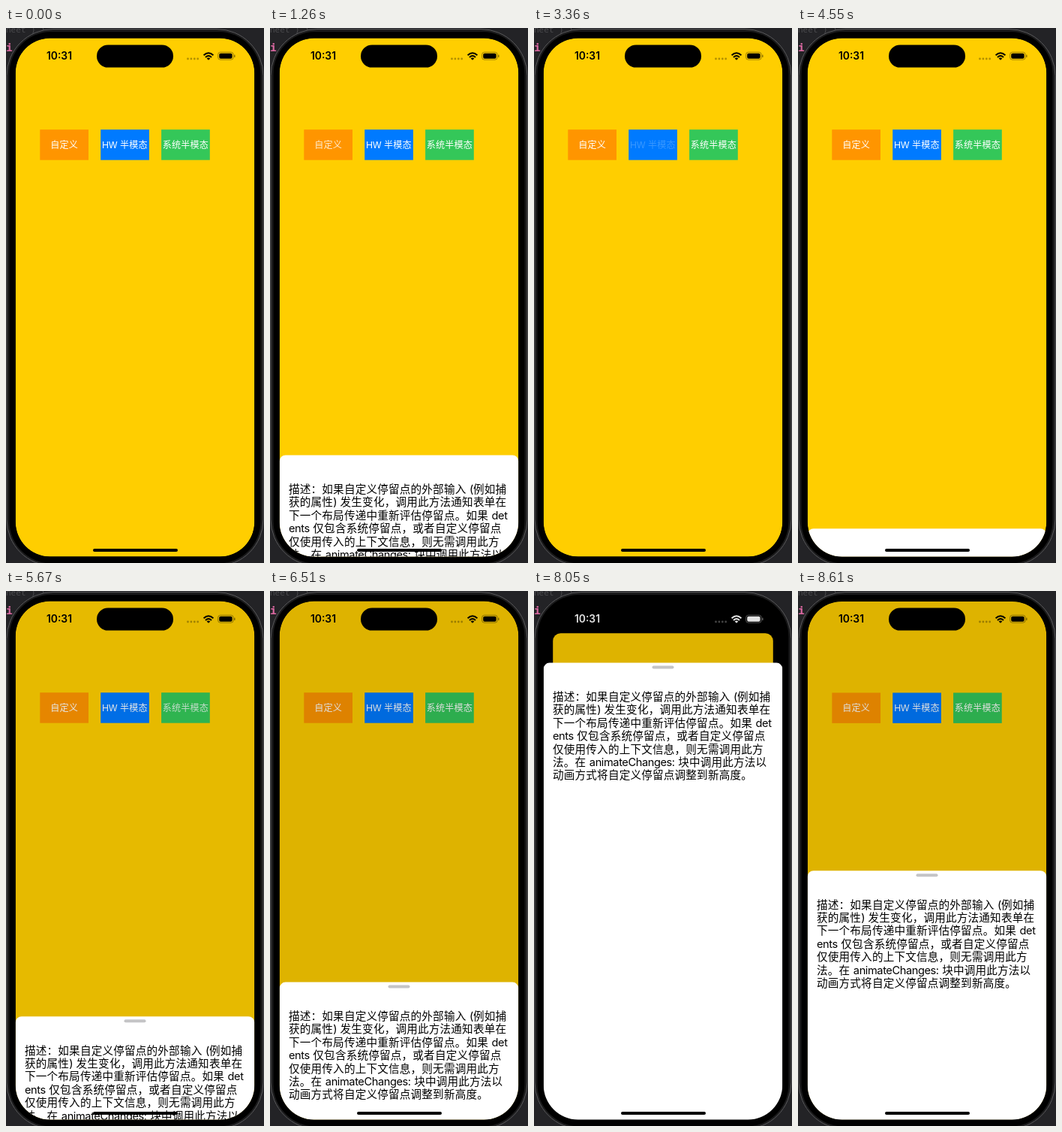
An HTML page that plays this animation: 344x712 px, repeating every 8680 ms.

```html
<!DOCTYPE html>
<html lang="zh-CN">
<head>
<meta charset="utf-8">
<title>半模态</title>
<style>
html, body { margin: 0; width: 100%; height: 100%; overflow: hidden; background: #232326; }
svg { display: block; width: 344px; height: 712px; }
text { font-family: "Noto Sans CJK SC", "Noto Sans CJK", sans-serif; white-space: pre; letter-spacing: .2px; }
.latin { font-family: Inter, Roboto, sans-serif; letter-spacing: -.4px; word-spacing: .8px; }
.label { font-size: 12.1px; fill: #fff; text-anchor: middle; }
.body { font-size: 14.58px; }
.code { font-family: "Noto Sans Mono", "DejaVu Sans Mono", monospace; letter-spacing: 0; }
.time { font: 600 13.8px Inter, sans-serif; letter-spacing: 0; text-anchor: middle; fill: currentColor; }
</style>
</head>
<body>
<svg viewBox="0 0 344 712">
  <defs>
    <clipPath id="screenClip"><rect x="12.7" y="13.6" width="318.6" height="689.8" rx="46"/></clipPath>
    <clipPath id="cardClip"><rect id="cardShape" x="12.7" y="13.6" width="318.6" height="689.8" rx="46"/></clipPath>
  </defs>

  <rect width="344" height="712" fill="#232326"/>
  <text class="code" x="0" y="6" font-size="11" fill="#4b4b4e">heet ) }</text>
  <text class="code" x="0" y="31" font-size="15" font-weight="700" fill="#d7679f">i</text>

  <rect x="1" y="1.5" width="342" height="714.5" rx="62" fill="#1b1b1c" stroke="#59595b"/>
  <rect x="4.5" y="5" width="335" height="707.5" rx="56" fill="#000"/>

  <g clip-path="url(#screenClip)">
    <g id="card">
      <g clip-path="url(#cardClip)">
        <rect x="12" y="13" width="320" height="691" fill="#ffce00"/>
        <g id="buttons"></g>
        <rect id="dim" x="12" y="13" width="320" height="691" opacity="0"/>
      </g>
    </g>
    <g id="sheet">
      <rect x="12.7" width="318.6" height="720" rx="8" fill="#fff"/>
      <rect id="grabber" x="157.5" y="4" width="29" height="4" rx="2" fill="#c4c4c6"/>
      <g id="lines"></g>
    </g>
  </g>

  <rect x="121" y="22.4" width="102" height="30.2" rx="15.1"/>
  <g id="status">
    <text class="time" x="71" y="42">10:31</text>
    <g id="dots" fill="currentColor" opacity=".3"></g>
    <g fill="none" stroke="currentColor" stroke-width="2">
      <path d="M263.6 36.2Q270 30.4 276.4 36.2"/>
      <path d="M266 38.9Q270 35.2 274 38.9"/>
    </g>
    <path d="M267.7 40.5Q270 38.5 272.3 40.5L270 42.8Z" fill="currentColor"/>
    <rect x="282.6" y="32.2" width="20.6" height="10" rx="3.2" fill="none" stroke="currentColor" stroke-opacity=".4" stroke-width=".9"/>
    <rect x="284.2" y="33.7" width="17.4" height="7" rx="2" fill="currentColor"/>
    <rect x="304.2" y="35.5" width="1.3" height="3.5" rx=".6" fill="currentColor" opacity=".45"/>
  </g>
  <rect x="116" y="693" width="113" height="4" rx="2"/>
</svg>

<script>
const LOOP = 8680, STEP = 70;
const OFF = 712, LOW = 520.6, MID = 374, HIGH = 70;
const $ = id => document.getElementById(id);
const clamp = v => Math.min(1, Math.max(0, v));

// Easings take elapsed and total milliseconds.
const easeOut = (t, d) => 1 - (1 - clamp(t / d)) ** 2;
const easeInOut = (t, d) => (1 - Math.cos(Math.PI * clamp(t / d))) / 2;
const spring = t => 1 - (1 + .012 * t) * Math.exp(-.012 * t);

// start, duration, from, to, easing
const moves = [
  [0, 1, OFF, OFF, easeOut],
  [1050, 420, OFF, LOW, easeOut],
  [2170, 260, LOW, 704, easeOut],
  [2450, 1, OFF, OFF, easeOut],
  [3480, 0, OFF, LOW, spring],
  [4270, 400, LOW, 704, easeInOut],
  [4690, 1, OFF, OFF, easeOut],
  [5440, 0, OFF, LOW, spring],
  [6510, 0, LOW, MID, spring],
  [7256, 0, MID, HIGH, spring],
  [8010, 0, HIGH, MID, spring]
];
const systemStart = 5440;

const buttons = [
  { x: 45.3, fill: "#ff9500", text: "自定义", tap: 910 },
  { x: 126.2, fill: "#007aff", text: "HW 半模态", tap: 3360 },
  { x: 207.1, fill: "#34c759", text: "系统半模态", tap: 5320 }
];
const lines = [
  "描述：如果自定义停留点的外部输入 (例如捕",
  "获的属性) 发生变化，调用此方法通知表单在",
  "下一个布局传递中重新评估停留点。如果 det",
  "ents 仅包含系统停留点，或者自定义停留点",
  "仅使用传入的上下文信息，则无需调用此方",
  "法。在 animateChanges: 块中调用此方法以",
  "动画方式将自定义停留点调整到新高度。"
];

const mixed = s => s.replace(/[ -~]+/g, m => `<tspan class="latin">${m}</tspan>`);

$("buttons").innerHTML = buttons.map(b =>
  `<rect x="${b.x}" y="135.2" width="64.7" height="40.5" fill="${b.fill}"/>
   <text class="label" x="${b.x + 32.3}" y="160">${mixed(b.text)}</text>`).join("");
$("lines").innerHTML = lines.map((s, i) =>
  `<text class="body" x="25" y="${50.5 + i * 17.4}">${mixed(s)}</text>`).join("");
$("dots").innerHTML = [0, 1, 2, 3].map(i =>
  `<circle cx="${242.5 + i * 4.4}" cy="41" r="1.4"/>`).join("");
const labels = document.querySelectorAll(".label");

function sheetTop(t) {
  const [start, length, from, to, ease] = moves.filter(m => m[0] <= t).pop();
  return from + (to - from) * ease(t - start, length);
}

function labelAlpha(t, tap) {
  return t < tap ? 1 : .22 + .78 * clamp((t - tap - 140) / 280);
}

function draw(t) {
  const y = sheetTop(t);
  const system = t >= systemStart;
  const back = system ? clamp((MID - y) / (MID - HIGH)) : 0;
  const scale = 1 - .086 * back;

  $("sheet").setAttribute("transform", `translate(0 ${y})`);
  $("grabber").setAttribute("opacity", system ? 1 : 0);
  $("dim").setAttribute("opacity", system ? .13 * clamp((OFF - y) / (OFF - LOW)) : 0);
  $("card").setAttribute("transform",
    `translate(172 ${14 + 46.5 * back}) scale(${scale}) translate(-172 -14)`);
  $("cardShape").setAttribute("rx", 46 - 38 * back);

  const tone = Math.round(255 * clamp((back - .65) / .3));
  $("status").style.color = `rgb(${tone},${tone},${tone})`;
  buttons.forEach((b, i) => labels[i].setAttribute("opacity", labelAlpha(t, b.tap)));
}

const begin = performance.now();
function tick() {
  const t = (performance.now() - begin) % LOOP;
  draw(Math.floor(t / STEP) * STEP);
  requestAnimationFrame(tick);
}
tick();
</script>
</body>
</html>
```
